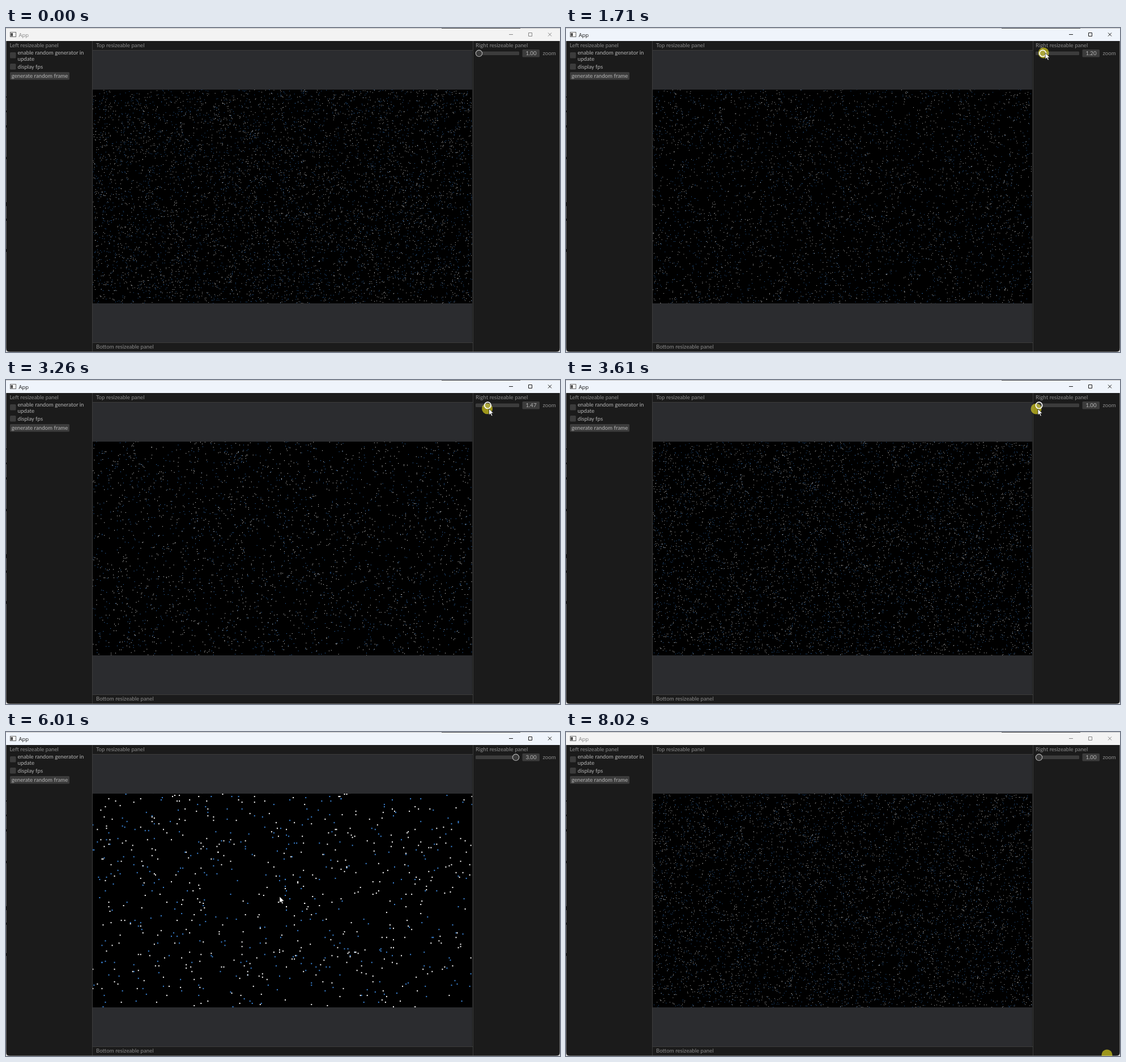
An HTML page with a canvas that plays this animation: 978 px wide and 573 px high, repeating every 8050 ms.

```html
<!DOCTYPE html>
<html lang="en">
<head>
<meta charset="utf-8">
<title>App</title>
<style>
  html, body { margin: 0; width: 978px; height: 573px; overflow: hidden; background: #1b1b1b; }
  canvas { position: absolute; left: 153px; top: 109px; }
  svg { position: absolute; left: 0; top: 0; }
  text { font: 9.7px Lato, "Open Sans", sans-serif; fill: #8c8c8c; white-space: pre; }
  .widget { fill: #3c3c3c; }
  .strong { fill: #b4b4b4; }
  .line { fill: none; stroke: #3c3c3c; }
  #title { font: 9.5px "Open Sans", "Noto Sans", sans-serif; }
  #press { mix-blend-mode: screen; }
</style>
</head>
<body>
<canvas id="field" width="670" height="378"></canvas>
<svg width="978" height="573" viewBox="0 0 978 573">
  <!-- panels -->
  <path fill="#1b1b1b" d="M0 23H978V39H0zM0 39H153V573H0zM823 39H978V573H823zM153 557H823V573H153z"/>
  <path fill="#2b2c2f" d="M153 39H823V109H153zM153 487H823V557H153z"/>
  <path class="line" d="M152.5 23V573M824.5 23V573M153 39.5H824M153 556.5H824"/>

  <!-- title bar -->
  <rect id="bar" width="978" height="23"/>
  <path fill="#c4c4c4" d="M0 0H978V1H0z"/>
  <path fill="#444" d="M769 0H908V1H769z"/>
  <rect x="7.5" y="7.5" width="10" height="8" fill="#fff" stroke="#666"/>
  <path fill="#444" d="M8.5 9H12V14.500H8.500z"/>
  <text id="title" x="22.500" y="15.500">App</text>
  <path id="buttons" fill="none" d="M888 11.500H895M922.500 8.500H928.500V14.500H922.500zM957 8.500L963 14.500M963 8.500L957 14.500"/>

  <!-- window edge -->
  <path fill="#686868" d="M0 23H1V573H0zM977 23H978V573H977zM0 572H978V573H0z"/>
  <path fill="none" stroke="#111" d="M.5 121V123M.5 146V149M.5 172V176M.5 228V232M.5 308V315M.5 337V341M.5 391V396"/>
  <path fill="#d8d8d8" d="M0 566Q0 573 7 573H0zM978 566Q978 573 971 573H978z"/>

  <!-- left panel -->
  <text x="6.500" y="33.500">Left resizeable panel</text>
  <rect class="widget" x="7" y="43" width="10.500" height="10.500" rx="1.500"/>
  <text class="strong" x="20.500" y="47">enable random generator in</text>
  <text class="strong" x="20.500" y="57.500">update</text>
  <rect class="widget" x="7" y="63" width="10.500" height="10.500" rx="1.500"/>
  <text class="strong" x="20.500" y="72">display fps</text>
  <rect class="widget" x="7" y="78" width="105" height="13.500" rx="1.500"/>
  <text class="strong" x="59.500" y="88" text-anchor="middle">generate random frame</text>

  <text x="159" y="33.500">Top resizeable panel</text>
  <text x="159" y="566.500">Bottom resizeable panel</text>

  <!-- right panel -->
  <text x="829" y="33.500">Right resizeable panel</text>
  <rect class="widget" x="829" y="41.500" width="77" height="6.500" rx="1.500"/>
  <rect class="widget" x="911.500" y="38" width="30.500" height="13.500" rx="1.500"/>
  <text id="value" class="strong" x="927" y="48" text-anchor="middle">1.00</text>
  <text x="947.500" y="48">zoom</text>
  <circle id="knob" class="widget" cy="44.800" r="5.700"/>

  <circle id="press" r="9.500" fill="#918a00"/>
  <path id="cursor" fill="#fff" stroke="#111" stroke-width=".7" d="M0 0V11.200L2.600 8.800L4.500 13L6.300 12.200L4.500 8.100H8z"/>
</svg>
<script>
const LOOP = 8050;
const $ = id => document.getElementById(id);
const ctx = $('field').getContext('2d');

// [time, zoom]
const zoomKeys = [
  [1600, 1], [1710, 1.2], [2210, 2.8], [2290, 3], [2650, 3], [3450, 1],
  [5000, 1], [5650, 3], [6150, 3], [6800, 1]
];

// [time, x, y] of the pointer tip
const tipKeys = [
  [60, 945, 575], [250, 918, 430], [500, 870, 180], [700, 845, 70], [850, 838, 46],
  [1600, 839, 44], [1710, 846, 44], [2210, 898, 48], [2290, 902, 49], [2650, 906, 50],
  [3450, 836, 51], [3610, 833, 51], [4000, 833, 52], [4100, 841, 70], [4300, 720, 160],
  [4550, 535, 270], [4750, 483, 291], [7000, 483, 291], [7150, 560, 350],
  [7360, 790, 493], [7600, 915, 548], [7900, 958, 573]
];

const pressed = t => (t >= 1350 && t < 3800) || t >= 7950;
const focused = t => t >= 1350 && t < 7950;

function track(keys, t) {
  const next = keys.findIndex(k => k[0] > t);
  if (next === 0) return keys[0].slice(1);
  if (next < 0) return keys[keys.length - 1].slice(1);
  const a = keys[next - 1], b = keys[next];
  const p = (t - a[0]) / (b[0] - a[0]);
  return a.slice(1).map((v, i) => v + (b[i + 1] - v) * p);
}

let seed = 20417;
function random() {
  seed = (Math.imul(seed, 1664525) + 1013904223) >>> 0;
  return seed / 4294967296;
}

const CELL = 0.67;
const scatter = n => Array.from({ length: n }, () => [
  Math.floor(random() * 1000 - 500) * CELL,
  Math.floor(random() * 564 - 282) * CELL
]);
const layers = [['#3d88dc', scatter(3200)], ['#ffffff', scatter(3700)]];

let drawnZoom = 0;
function drawField(zoom) {
  if (zoom === drawnZoom) return;
  drawnZoom = zoom;
  ctx.fillStyle = '#000';
  ctx.fillRect(0, 0, 670, 378);
  const size = Math.max(0.85, CELL * zoom);
  for (const [color, dots] of layers) {
    ctx.fillStyle = color;
    for (const [dx, dy] of dots) {
      const x = 335 + dx * zoom, y = 189 + dy * zoom;
      if (x > -3 && x < 670 && y > -3 && y < 378) ctx.fillRect(x, y, size, size);
    }
  }
}

function set(id, attrs) {
  for (const name in attrs) $(id).setAttribute(name, attrs[name]);
}

function draw(t) {
  const [zoom] = track(zoomKeys, t);
  const [x, y] = track(tipKeys, t);
  const down = pressed(t), active = focused(t);
  const dragging = down && t < 4000;
  const hover = t > 800 && t < 4080;

  drawField(zoom);
  $('value').textContent = zoom.toFixed(2);
  set('knob', {
    cx: 835 + (zoom - 1) * 32.5,
    stroke: dragging ? '#fff' : hover ? '#f0f0f0' : '#b4b4b4',
    'stroke-width': dragging ? 1.7 : hover ? 1.4 : 1.1
  });
  set('bar', { fill: active ? '#eff4fb' : '#f3f3f3' });
  $('title').style.fill = active ? '#1a1a1a' : '#858585';
  set('buttons', { stroke: active ? '#1a1a1a' : '#858585' });
  set('press', { cx: x - 3, cy: y - (t > 7900 ? 2 : 0), visibility: down ? 'visible' : 'hidden' });
  set('cursor', { transform: `translate(${x} ${y})`, visibility: t < 60 ? 'hidden' : 'visible' });
}

function tick() {
  draw(performance.now() % LOOP);
  requestAnimationFrame(tick);
}
tick();
</script>
</body>
</html>
```
